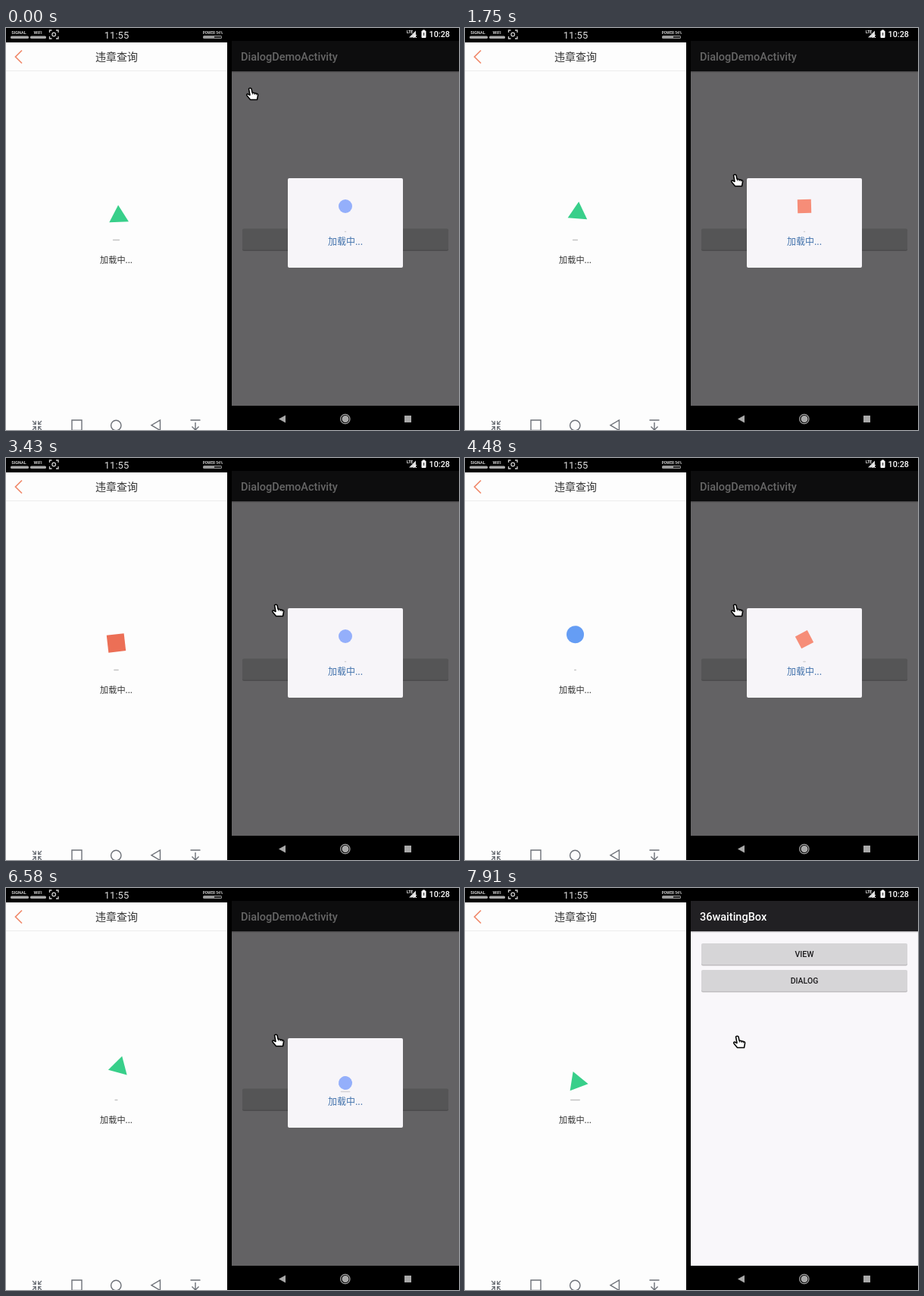
These frames come from a looping animation (598x530 px, 8 s). An HTML page with a canvas:

```html
<!DOCTYPE html>
<html lang="zh">
<head>
<meta charset="utf-8">
<style>
  html, body { margin: 0; width: 598px; height: 530px; overflow: hidden; background: #000; }
  canvas { display: block; }
</style>
</head>
<body>
<canvas id="stage" width="598" height="530"></canvas>
<script>
const ctx = document.getElementById('stage').getContext('2d');
const CJK = '"Noto Sans CJK SC", "Noto Sans CJK", "Noto Sans", sans-serif';
const LATIN = 'Roboto, sans-serif';
const LOOP = 8000, STEP = 70, LAST = 113;
const clamp = x => Math.max(0, Math.min(1, x));

function rect(x, y, w, h, color, r = 0) {
  ctx.fillStyle = color;
  ctx.beginPath();
  ctx.roundRect(x, y, w, h, r);
  ctx.fill();
}

function text(str, x, y, font, color, align = 'left') {
  ctx.font = font;
  ctx.fillStyle = color;
  ctx.textAlign = align;
  ctx.fillText(str, x, y);
}

function path(d, stroke, width = 1.4, fill) {
  const p = new Path2D(d);
  if (fill) { ctx.fillStyle = fill; ctx.fill(p); }
  if (stroke) { ctx.strokeStyle = stroke; ctx.lineWidth = width; ctx.stroke(p); }
}

// Each hop: [start time, shape]; it lasts until the next hop starts.
const left = {
  x: 145.5, top: 230, bottom: 262, size: 23, radius: 14.8, offset: 3.9, spin: 0.28, squareFall: 113,
  ground: 279.5, shadow: '#c4c4c4',
  colors: { circle: '#659df4', square: '#ec6f56', triangle: '#38cf8a' },
  hops: [[-900, 'triangle'], [100, 'circle'], [823, 'square'], [1300, 'triangle'], [1831, 'circle'],
    [2600, 'square'], [3600, 'triangle'], [4250, 'circle'], [4900, 'square'], [5723, 'triangle'],
    [6891, 'circle'], [7225, 'square'], [7560, 'triangle'], [7919, '']]
};
const right = {
  x: 448, top: 235, bottom: 260, size: 18, radius: 10.4, offset: 0, spin: 0.7, squareFall: 90,
  ground: 268.5, shadow: '#d3d1d5',
  colors: { circle: '#94affb', square: '#f68d78', triangle: '#88d397' },
  hops: [[300, 'circle'], [1320, 'square'], [2160, 'triangle'], [3000, 'circle'],
    [3860, 'square'], [4740, 'triangle'], [5630, 'circle'], [6610, 'square'], [7500, '']]
};

function bounce(b, t) {
  const next = Math.max(1, b.hops.findIndex(h => h[0] > t));
  const [start, shape] = b.hops[next - 1];
  const phase = 2 * (t - start) / (b.hops[next][0] - start) - 1;
  const waiting = next === 1 && phase < 0;
  const v = waiting ? 0 : Math.abs(phase);
  const ease = (1 - v) ** b.spin;
  const fall = shape === 'square' ? b.squareFall : 90;
  const angle = phase < 0 ? -(180 - fall) * ease : -180 + fall * ease;

  const w = 2.5 + 12 * v ** 2.5;
  rect(b.x - w / 2, b.ground - 0.8, w, 1.6, b.shadow, 0.8);

  ctx.save();
  ctx.translate(b.x, b.top + (b.bottom - b.top) * v * v);
  ctx.rotate(angle * Math.PI / 180);
  const s = b.size, r = b.radius;
  if (shape === 'circle') rect(-s / 2, -s / 2, s, s, b.colors.circle, s / 2);
  if (shape === 'square') rect(-s / 2, -s / 2, s, s, b.colors.square);
  if (shape === 'triangle') {
    ctx.translate(0, b.offset);
    path(`M0 ${-r}L${r * 0.866} ${r / 2}H${-r * 0.866}Z`, null, 0, b.colors.triangle);
  }
  ctx.restore();
}

function leftPhone(t) {
  rect(0, 0, 292, 530, '#fdfdfd');
  rect(0, 0, 292, 19, '#000');
  text('SIGNAL', 17, 7.5, `bold 5.5px ${LATIN}`, '#ccc', 'center');
  text('WIFI', 42, 7.5, `bold 5.5px ${LATIN}`, '#ccc', 'center');
  text('POWER 54%', 273, 7.5, `bold 4.8px ${LATIN}`, '#ccc', 'center');
  rect(6, 10.5, 24, 3.5, '#aaa', 1.5);
  rect(32, 10.5, 21, 3.5, '#aaa', 1.5);
  rect(260, 10, 25, 4, '#999', 1.5);
  rect(275, 11, 9, 2, '#222');
  path('M57.5 6V3H60.5M66 3H69V6M69 11V14H66M60.5 14H57.5V11M65.5 8.5A2.3 2.3 0 1 1 60.9 8.5A2.3 2.3 0 1 1 65.5 8.5', '#ccc', 1.3);
  text('11:55', 146, 14, `13px ${LATIN}`, '#ddd', 'center');

  path('M21 29.5L12.5 38L21 46.5', '#f08a6c', 1.7);
  text('违章查询', 146, 43, `14px ${CJK}`, '#333', 'center');
  rect(0, 56, 292, 1, '#ececec');

  bounce(left, t);
  text('加载中...', 145.5, 310, `11.2px ${CJK}`, '#333', 'center');

  ctx.globalAlpha = Math.min(clamp((t - 210) / 210), clamp((1050 - t) / 210));
  rect(28, 421, 235, 34, '#43cfe1');
  text('无法下载推荐设置，请检查您的网络连接。', 38, 442.5, `11.5px ${CJK}`, '#fff');
  ctx.globalAlpha = 1;

  const gray = '#6d7178';
  path('M35 518L39 522M35.5 522.3H39.3V518M47 518L43 522M46.5 522.3H42.7V518M35 530L39 526M35.5 525.7H39.3V530M47 530L43 526M46.5 525.7H42.7V530', gray, 1.3);
  path('M87 517H100V530.5H87ZM152 524A6.7 6.7 0 1 1 138.6 524A6.7 6.7 0 1 1 152 524M203.5 517V530.5L192 523.7Z', gray);
  path('M243.5 517H256.5M250 520V530M245.5 525.5L250 530L254.5 525.5', gray);
}

function button(label, y) {
  rect(312, y + 1, 272, 28.5, '#bfbdc0', 2);
  rect(312, y, 272, 28, '#d6d5d7', 2);
  text(label, 448, y + 18, `500 10.5px ${LATIN}`, '#1c1b1d', 'center');
}

function page(title, buttons) {
  rect(298, 17, 300, 481, '#f9f7fa');
  rect(298, 57, 300, 1, '#bab8bb');
  rect(298, 58, 300, 1, '#e4e2e5');
  rect(298, 17, 300, 40, '#212023');
  text(title, 310, 42.5, `500 14.5px ${LATIN}`, '#fff');
  buttons.forEach(([label, y]) => button(label, y));
}

function rightPhone(t) {
  const leave = clamp((t - 6930) / 280);
  if (leave > 0) page('36waitingBox', [['VIEW', 73], ['DIALOG', 108]]);
  if (leave < 1) {
    ctx.save();
    ctx.globalAlpha = 1 - leave;
    ctx.translate(0, 20 * leave * leave);
    page('DialogDemoActivity', [['DIALOG', 264.5]]);
    ctx.restore();
  }
  if (t < 6650) {
    rect(298, 17, 300, 481, 'rgba(0,0,0,.6)');
    rect(372, 198, 152, 118, '#f7f5f9', 2);
    bounce(right, t);
    text('加载中...', 448, 286, `12px ${CJK}`, '#4272ac', 'center');
  }

  rect(298, 0, 300, 17, '#000');
  text('10:28', 586, 12, `500 10.8px ${LATIN}`, '#fff', 'right');
  text('LTE', 529, 7, `bold 5px ${LATIN}`, '#fff');
  path('M541 3.5V12.5H532Z', null, 0, '#ddd');
  path('M538 9L542 13M542 9L538 13', '#fff', 1);
  rect(548.5, 3.5, 6, 9.5, '#fff', 1);
  rect(550, 2.5, 3, 2, '#fff');
  rect(551, 6, 1.2, 4, '#333');

  rect(298, 498, 300, 32, '#000');
  path('M369 510.5V520.5L360 515.5Z', null, 0, '#a9a9a9');
  rect(443.5, 511, 9, 9, '#a9a9a9', 4.5);
  path('M454 515.5A6.2 6.2 0 1 1 441.6 515.5A6.2 6.2 0 1 1 454 515.5', '#a9a9a9', 1.2);
  rect(526, 511, 9, 9, '#a9a9a9');
}

function hand(t) {
  const rest = 1 - clamp((t - 210) / 980);
  const drift = clamp((t - 6930) / 140);
  ctx.save();
  ctx.translate(355 - 34 * rest ** 4 + 3 * drift, 193 - 114 * rest ** 2.3 + 2 * drift);
  ctx.lineJoin = 'round';
  path('M-.5 1Q1.5-.5 3 1L4 6L10 7.5Q12 8 11.5 10L10.5 15.5H1.5L-3 10Q-4 8-2 8L1 9.5Z', '#000', 1.5, '#fff');
  path('M4.5 6V8.5M7 7V9M9.3 7.7V9.5', '#000', 0.9);
  ctx.restore();
}

function frame(now) {
  const t = Math.min(Math.floor(now % LOOP / STEP), LAST) * STEP;
  rect(0, 0, 598, 530, '#000');
  leftPhone(t);
  rightPhone(t);
  hand(t);
  requestAnimationFrame(frame);
}
requestAnimationFrame(frame);
</script>
</body>
</html>
```
